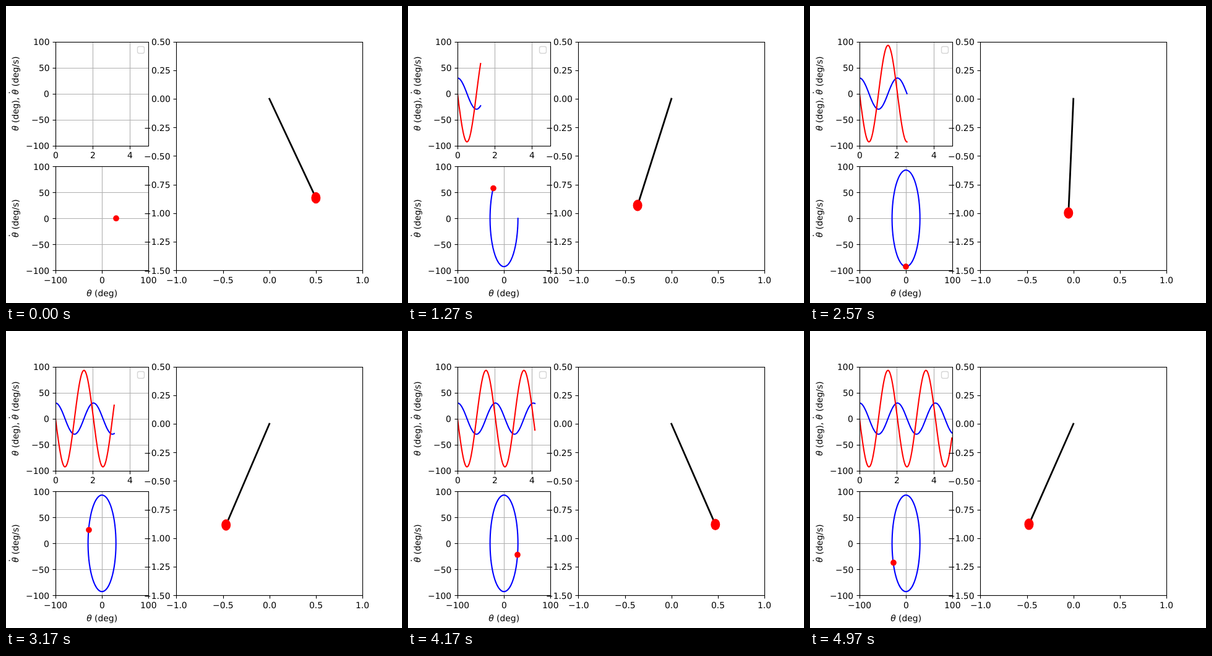
Animation, 640 px wide and 480 px high, one loop 5010 ms. Source, as an HTML page with a canvas:

```html
<!DOCTYPE html>
<html lang="en">
<head>
<meta charset="utf-8">
<title>Pendulum with time and phase plots</title>
<style>
  html, body { margin: 0; width: 100%; height: 100%; overflow: hidden; background: #fff; }
  canvas { display: block; }
</style>
</head>
<body>
<canvas id="stage" width="640" height="480"></canvas>
<script>
const ctx = document.getElementById('stage').getContext('2d');
const LOOP = 5010, COUNT = 150, SPAN = 5, GRAVITY = 9.81;
const PT = 100 / 72;
const SIZE = 10 * PT;
const FAMILY = '"DejaVu Sans", sans-serif';
const DEG = 180 / Math.PI;
const snap = v => Math.floor(v + 0.5) + 0.5;
const range = (from, to, step) =>
  Array.from({ length: Math.round((to - from) / step) + 1 }, (_, i) => from + i * step);

// Pendulum states at evenly spaced times, integrated with RK4.
function simulate() {
  const sub = 10, h = SPAN / (COUNT - 1) / sub;
  const acc = a => -GRAVITY * Math.sin(a);
  const states = [];
  let a = 30 / DEG, w = 0;
  for (let i = 0; i < COUNT; i++) {
    states.push({ t: i * h * sub, a, w });
    for (let k = 0; k < sub; k++) {
      const w1 = w, g1 = acc(a);
      const w2 = w + g1 * h / 2, g2 = acc(a + w1 * h / 2);
      const w3 = w + g2 * h / 2, g3 = acc(a + w2 * h / 2);
      const w4 = w + g3 * h, g4 = acc(a + w3 * h);
      a += h * (w1 + 2 * w2 + 2 * w3 + w4) / 6;
      w += h * (g1 + 2 * g2 + 2 * g3 + g4) / 6;
    }
  }
  return states;
}

function makeAxes(left, top, right, bottom, xLim, yLim, opts) {
  return {
    left, top, right, bottom, ...opts,
    x: v => left + (v - xLim[0]) / (xLim[1] - xLim[0]) * (right - left),
    y: v => bottom - (v - yLim[0]) / (yLim[1] - yLim[0]) * (bottom - top)
  };
}

const hundred = [-100, 100];
const fifties = range(-100, 100, 50);
const timeAxes = makeAxes(80, 57.6, 230.3, 225.6, [0, SPAN], hundred,
  { xTicks: [0, 2, 4], yTicks: fifties, digits: [0, 0], grid: true });
const phaseAxes = makeAxes(80, 259.2, 230.3, 427.2, hundred, hundred,
  { xTicks: [-100, 0, 100], yTicks: fifties, digits: [0, 0], grid: true });
const swingAxes = makeAxes(275.39, 57.6, 576, 427.2, [-1, 1], [-1.5, 0.5],
  { xTicks: range(-1, 1, 0.5), yTicks: range(-1.5, 0.5, 0.25), digits: [1, 2], grid: false });

function stroke(points, color, width, cap = 'butt') {
  ctx.strokeStyle = color;
  ctx.lineWidth = width * PT;
  ctx.lineCap = cap;
  ctx.lineJoin = 'round';
  ctx.beginPath();
  points.forEach(([x, y], i) => i ? ctx.lineTo(x, y) : ctx.moveTo(x, y));
  ctx.stroke();
}

function ellipse(x, y, rx, ry) {
  ctx.fillStyle = '#f00';
  ctx.beginPath();
  ctx.ellipse(x, y, rx, ry, 0, 0, 2 * Math.PI);
  ctx.fill();
}

function clipTo(ax, draw) {
  ctx.save();
  ctx.beginPath();
  ctx.rect(ax.left, Math.round(ax.top), Math.round(ax.right) - ax.left,
    Math.round(ax.bottom) - Math.round(ax.top));
  ctx.clip();
  draw();
  ctx.restore();
}

function setFont(style = '') {
  ctx.font = `${style} ${SIZE}px ${FAMILY}`;
  ctx.fillStyle = '#000';
}

// share: how much of the text lies left of x
function tickLabel(value, digits, x, y, share) {
  const text = value.toFixed(digits).replace('-', '\u2212');
  setFont();
  ctx.fillText(text, Math.round(x - ctx.measureText(text).width * share), Math.round(y));
}

// Text runs centred on a point; θ is oblique and "." before it adds a dot above.
function mathLabel(runs, x, y, turn) {
  const parts = runs.map(run => {
    const theta = run.endsWith('θ');
    const text = theta ? 'θ' : run;
    const style = theta ? 'oblique' : '';
    setFont(style);
    return { text, style, dot: run === '.θ', width: ctx.measureText(text).width };
  });
  ctx.save();
  ctx.translate(x, y);
  ctx.rotate(turn);
  let pen = -parts.reduce((sum, p) => sum + p.width, 0) / 2;
  for (const p of parts) {
    setFont(p.style);
    ctx.fillText(p.text, pen, 0);
    if (p.dot) ctx.fillRect(pen + p.width / 2 - 2, -15.4, 1.6, 1.6);
    pen += p.width;
  }
  ctx.restore();
}

function drawAxes(ax, content) {
  const { left, top, right, bottom } = ax;
  const l = snap(left), r = snap(right), t = snap(top), b = snap(bottom);
  const xs = ax.xTicks.map(v => snap(ax.x(v)));
  const ys = ax.yTicks.map(v => snap(ax.y(v)));
  if (ax.grid) {
    xs.forEach(x => stroke([[x, t], [x, b]], '#b0b0b0', 0.8));
    ys.forEach(y => stroke([[l, y], [r, y]], '#b0b0b0', 0.8));
  }
  xs.forEach(x => stroke([[x, b], [x, b + 5]], '#000', 0.8));
  ys.forEach(y => stroke([[l, y], [l - 5, y]], '#000', 0.8));
  clipTo(ax, content);
  ctx.lineJoin = 'miter';
  ctx.strokeStyle = '#000';
  ctx.lineWidth = 0.8 * PT;
  ctx.strokeRect(l, t, r - l, b - t);
  ax.xTicks.forEach(v => tickLabel(v, ax.digits[0], ax.x(v), bottom + 20.6, 0.5));
  ax.yTicks.forEach(v => tickLabel(v, ax.digits[1], left - 9.72, ax.y(v) + 5.4, 1));
}

function drawLegendBox() {
  ctx.beginPath();
  ctx.roundRect(212.5, 65.5, 11, 11, 2.78);
  ctx.fillStyle = 'rgba(255,255,255,0.8)';
  ctx.fill();
  ctx.strokeStyle = 'rgba(204,204,204,0.8)';
  ctx.lineWidth = PT;
  ctx.stroke();
}

const states = simulate();

function draw(step) {
  const past = states.slice(0, step);
  const last = states[Math.max(step - 1, 0)];
  const now = states[step];
  const curve = (ax, fx, fy, color) =>
    stroke(past.map(s => [ax.x(fx(s)), ax.y(fy(s))]), color, 1.5, 'square');
  const time = s => s.t, angle = s => s.a * DEG, speed = s => s.w * DEG;

  ctx.fillStyle = '#fff';
  ctx.fillRect(0, 0, 640, 480);
  ctx.textRendering = 'geometricPrecision';

  drawAxes(timeAxes, () => {
    curve(timeAxes, time, angle, '#00f');
    curve(timeAxes, time, speed, '#f00');
  });
  drawLegendBox();
  mathLabel(['θ', ' (deg), ', '.θ', ' (deg/s)'], 20, 141.6, -Math.PI / 2);

  drawAxes(phaseAxes, () => {
    curve(phaseAxes, angle, speed, '#00f');
    ellipse(Math.round(phaseAxes.x(angle(last))), phaseAxes.y(speed(last)), 4.86, 4.86);
  });
  mathLabel(['.θ', ' (deg/s)'], 20, 343.2, -Math.PI / 2);
  mathLabel(['θ', ' (deg)'], 155.15, 469, 0);

  drawAxes(swingAxes, () => {
    const x = swingAxes.x(Math.sin(now.a)), y = swingAxes.y(-Math.cos(now.a));
    stroke([[swingAxes.x(0), swingAxes.y(0)], [x, y]], '#000', 2, 'square');
    ellipse(x, y, 7.515, 9.24);
  });
}

const start = performance.now();
let shown = -1;

function tick() {
  const t = Math.floor((performance.now() - start) % LOOP / 10) * 10;
  const step = Math.min(COUNT - 1, Math.floor((t + 5) * 0.03));
  if (step !== shown) draw(shown = step);
  requestAnimationFrame(tick);
}
tick();
</script>
</body>
</html>
```
